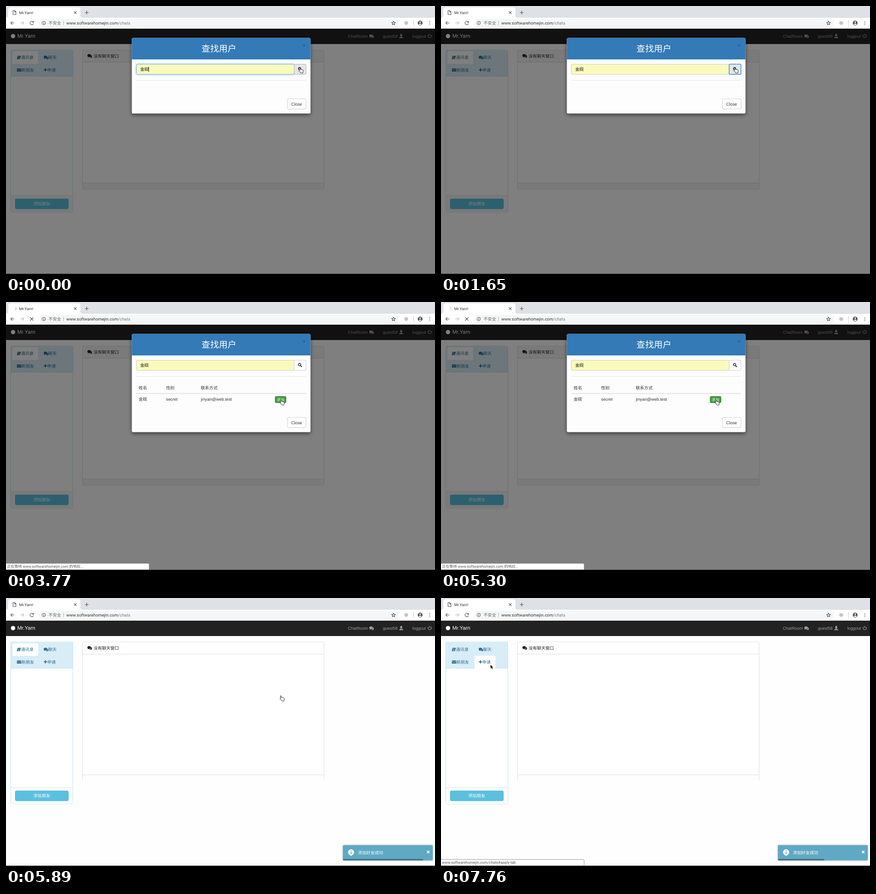
Recreate the animation shown at these times as an HTML page. Size 946 by 592 pixels, loop 8 s.

```html
<!DOCTYPE html>
<html lang="zh-CN">
<head>
<meta charset="utf-8">
<title>Mr.Yarn!</title>
<style>
  html, body { margin: 0; width: 100%; height: 100%; overflow: hidden; background: #fff; }
  svg { display: block; }
  text {
    font: 9.3px "Liberation Sans", "Noto Sans CJK SC", "Noto Sans CJK", sans-serif;
    text-rendering: geometricPrecision; white-space: pre;
  }
  .ui text { font-family: Roboto, "Noto Sans CJK SC", "Noto Sans CJK", sans-serif; fill: #333; }
  .ui .small { font-size: 8.25px; fill: #555; }
  .line { fill: none; stroke: #50545a; stroke-width: 1.2; }
  .nav { fill: #9d9d9d; }
  .nav text { font-size: 9.2px; }
  .info { fill: #31708f; }
  .mid { font-weight: 500; }
  .bold { font-weight: 700; }
</style>
</head>
<body>
<svg width="946" height="592" viewBox="0 0 946 592">
  <defs>
    <g id="chats">
      <ellipse cx="4" cy="3.3" rx="4" ry="3.1"/>
      <path d="M1.4 5 .8 7.6 4 6z"/>
      <path d="M8.6 2.2C10.7 3.4 10.8 5.9 9.3 7.2l.6 1.5-2.2-.9C6.200 8.100 5 7.700 4.300 7 7 7 8.900 5 8.600 2.200z"/>
    </g>
    <g id="glass" fill="none" stroke="#222">
      <circle cx="3.300" cy="3.300" r="2.600" stroke-width="1.400"/>
      <path d="M5.300 5.300 8.400 8.400" stroke-width="1.900"/>
    </g>
    <path id="hand" d="M.2 1.200C.2-.2 2-.2 2.200 1.200L2.700 4.200 4 4 5.500 4.300 7 4.800 8.400 5.600C9.300 7 8.700 9 8.200 10.300V12H3.500L3 10.600-.6 7.500C-1.200 6.500 0 6 .8 6.700z"
      fill="#fff" stroke="#111" stroke-width=".95" stroke-linejoin="round"/>
  </defs>

  <rect width="946" height="592" fill="#fefefe"/>

  <!-- page -->
  <g>
    <rect y="50" width="946" height="34" fill="#222"/>
    <circle cx="15.500" cy="66.500" r="4.800" fill="#fff"/>
    <text x="25" y="70.300" fill="#fff" style="font-size:11.500px">Mr.Yarn</text>
    <g class="nav">
      <text x="754" y="69.800">ChatRoom</text>
      <use href="#chats" x="801" y="62.500"/>
      <text x="831" y="69.800">guest58</text>
      <ellipse cx="871.500" cy="64.500" rx="2.300" ry="3"/>
      <path d="M867 71c0-2 2-2.600 3.300-3h2.400c1.300.4 3.300 1 3.300 3z"/>
      <text x="896" y="69.800">loggout</text>
      <path d="M932 63.400a3.700 3.700 0 1 0 4.600 0M934.300 61.800v4.400" fill="none" stroke="#9d9d9d" stroke-width="1.200"/>
    </g>

    <rect x="10.500" y="97" width="137" height="358" rx="2.500" fill="#fff" stroke="#bce8f1"/>
    <path d="M11 155V98h136v57z" fill="#d9edf7"/>
    <path d="M11 155.200h136" stroke="#bce8f1"/>
    <path id="tabA" d="M14 128v-25.500q0-2.500 2.500-2.500h52q2.500 0 2.500 2.500V128z" fill="#fff"/>
    <path id="tabB" d="M74 156v-26q0-2.500 2.500-2.500h41q2.500 0 2.500 2.500v26z"/>
    <g class="info">
      <path d="M25.800 110h7l-2 7.600h-7.200z"/>
      <path d="M26.500 112.200h4.200M26 114h4.200M24.500 116.400h6" stroke="#d9edf7" stroke-width=".6"/>
      <text x="33" y="117.300">通讯录</text>
      <use href="#chats" x="83" y="109.500"/>
      <text x="93" y="117.300">聊天</text>
      <path d="M24 138h9.600v6.800H24z"/>
      <path d="M24 139.300l4.800 3 4.800-3" fill="none" stroke="#d9edf7" stroke-width=".8"/>
      <text x="34" y="144.600">新朋友</text>
      <path d="M83.500 141h7M87 137.500v7" stroke="#31708f" stroke-width="2"/>
      <text x="91" y="144.600">申请</text>
    </g>
    <rect class="shade" x="11" y="419" width="136" height="35.500"/>
    <path d="M11 418.800h136" stroke="#ddd"/>
    <rect x="20.500" y="426" width="117" height="22" rx="2.500" fill="#5bc0de" stroke="#46b8da"/>
    <text class="mid" x="60.300" y="440.400" fill="#fff">添加朋友</text>

    <rect x="168.500" y="97" width="533" height="308" rx="2.500" fill="#fff" stroke="#ddd"/>
    <rect class="shade" x="169" y="97.500" width="532" height="26.500"/>
    <rect class="shade" x="169" y="391" width="532" height="13.500"/>
    <path d="M169 124h532M169 390.800h532" stroke="#ddd"/>
    <rect id="noEdge" x="167" y="403.500" width="536" height="3" fill="#fefefe"/>
    <use href="#chats" x="179.500" y="106" fill="#222"/>
    <text x="193" y="113.600" fill="#222">没有聊天窗口</text>
  </g>

  <!-- notification -->
  <g id="toast">
    <rect id="toastBox" x="743" y="546" width="198" height="33.500" rx="2" fill="#5fa9c4"/>
    <circle cx="761" cy="561.800" r="6.800" fill="#fff"/>
    <path d="M759 567.500l2 2.800 2-2.800z" fill="#fff"/>
    <path d="M761 560.500v5.500M761 557v2" stroke="#5fa9c4" stroke-width="1.800"/>
    <text class="mid" x="776" y="566" fill="#fff">添加好友成功</text>
    <path d="M928.300 558.300l5.400 5.400m0-5.400l-5.400 5.400" stroke="#fff" stroke-width="1.800"/>
    <rect id="progress" x="743" y="576.800" width="0" height="2.700" fill="#000" opacity=".4"/>
  </g>

  <rect id="backdrop" y="50" width="946" height="542" opacity=".5"/>

  <!-- dialog -->
  <g id="modal">
    <rect id="modalBox" x="277.500" y="70.500" width="394" height="167" rx="3" fill="#fdfdfd"
      style="filter:drop-shadow(0 3px 4px rgba(0,0,0,.55))"/>
    <path d="M277.500 118V73q0-2.500 2.500-2.500h389q2.500 0 2.500 2.500v45z" fill="#337ab7"/>
    <text class="mid" x="431" y="101.300" fill="#fff" style="font-size:19.300px">查找用户</text>
    <path d="M654.800 84.700l5 5m0-5l-5 5" stroke="#235480"/>
    <rect id="field" x="287.500" y="128.500" width="348" height="22.500" rx="2.500" fill="#f9fabc"/>
    <text x="296" y="143.200" fill="#111">金砚</text>
    <path id="caret" d="M314.800 134.500v10.500" stroke="#111"/>
    <rect id="find" x="635.500" y="128.500" width="26" height="22.500" rx="2"/>
    <use href="#glass" x="644" y="135"/>
    <path d="M287 164.500h375" stroke="#e8e8e8"/>
    <g id="results" fill="#333">
      <g class="bold">
        <text class="mid" x="292.500" y="193.200">姓名</text>
        <text class="mid" x="353" y="193.200">性别</text>
        <text class="mid" x="429.500" y="193.200">联系方式</text>
      </g>
      <path d="M287 202.300h375" stroke="#ddd" stroke-width="1.400"/>
      <text x="292.500" y="218.300">金砚</text>
      <text x="353" y="218.300">secret</text>
      <text x="429.800" y="218.300">jinyan@web.test</text>
      <rect id="add" x="593.500" y="208.500" width="24" height="14" rx="2"/>
      <text class="mid" x="597.500" y="218.600" fill="#fff" style="font-size:8px">添加</text>
    </g>
    <g id="close">
      <rect x="620.500" y="205" width="41" height="22.500" rx="2.500" fill="#fff" stroke="#ccc"/>
      <text x="629" y="219.600" fill="#333">Close</text>
    </g>
  </g>

  <!-- browser -->
  <g class="ui">
    <rect width="946" height="27" fill="#dee1e6"/>
    <path d="M0 26q5 0 5-5V8q0-5 5-5h149q5 0 5 5v13q0 5 5 5h777v24H0z" fill="#fff"/>
    <g id="sheet">
      <path class="line" d="M15.500 10.300h4l2.300 2.400v6.300h-6.300zM19.300 10.300v2.600h2.500" stroke-width="1"/>
    </g>
    <g id="busy" transform="translate(18.300 14.500)">
      <path id="arc" d="M-.7-4A4.100 4.100 0 0 1 4.100.4" fill="none" stroke="#888"/>
    </g>
    <text x="29" y="17.500" style="font-size:8.500px">Mr.Yarn!</text>
    <path class="line" d="M150 11.800l5.400 5.400m0-5.400l-5.400 5.400M174 14.500h8M178 10.500v8"/>
    <path class="line" d="M18.500 37.500h-8m3.800-3.800l-3.800 3.800 3.800 3.800"/>
    <path class="line" d="M31.500 37.500h8m-3.800-3.800l3.800 3.800-3.800 3.800" style="stroke:#bbb"/>
    <g id="reload">
      <path class="line" d="M60 34.900a4 4 0 1 0 .8 3.700"/>
      <path d="M61.500 32.800v4h-4z" fill="#50545a"/>
    </g>
    <path id="stop" class="line" d="M53.300 34l7 7m0-7l-7 7"/>
    <rect x="73" y="28.500" width="793" height="18.500" rx="9.250" fill="#f5f6f7"/>
    <circle class="line" cx="83.300" cy="37.500" r="3.900" style="stroke-width:1"/>
    <path class="line" d="M83.300 36.800v3M83.300 34.900v1"/>
    <text x="93.700" y="41" style="fill:#666">不安全</text>
    <path d="M126.800 33v9.500" stroke="#aaa"/>
    <text x="133" y="41" style="font-size:9.400px">www.softwarehomejin.com<tspan fill="#777">/chats</tspan></text>
    <path class="line" d="M854.500 33.300l1.200 2.900 3.100.2-2.400 2 .8 3-2.700-1.700-2.700 1.700.8-3-2.400-2 3.100-.2z" stroke-linejoin="round"/>
    <circle cx="882.500" cy="37.500" r="4.300" fill="#c4c6c8"/>
    <path d="M898.500 32v11" stroke="#ccc"/>
    <circle cx="913.300" cy="37.500" r="5.300" fill="#50545a"/>
    <circle cx="913.300" cy="35.700" r="1.700" fill="#fff"/>
    <path d="M909.800 40.300q3.500-3 7 0-3.500 3-7 0z" fill="#fff"/>
    <path d="M934.500 33.200v1.600m0 2v1.600m0 2v1.600" stroke="#50545a" stroke-width="1.600"/>
    <g id="status">
      <path d="M-1 577.500h314q2.500 0 2.500 2.500v11.500H-1z" fill="#fff" stroke="#999"/>
      <text class="small" id="linkA" x="2" y="587.300">www.softwarehomejin.com/friendships?friend_id=107</text>
      <text class="small" id="waiting" x="2" y="587.300">正在等待 www.softwarehomejin.com 的响应...</text>
      <text class="small" id="linkB" x="2" y="587.300">www.softwarehomejin.com/chats#apply-tab</text>
    </g>
    <path d="M0 591.500h946" stroke="#444"/>
  </g>

  <g id="pointer"><use href="#hand"/></g>
  <g id="arrow">
    <path d="M0 0v9.200l2.100-1.900 1.500 3.300 1.600-.7-1.500-3.200h2.900z" fill="#000" stroke="#fff" stroke-width=".6"/>
  </g>
</svg>
<script>
const LOOP = 8000;

// Holds each value from its time until the next one.
function track(target, prop, steps) {
  const frames = steps.map(([time, value]) => ({ offset: time / LOOP, [prop]: value, easing: 'steps(1, end)' }));
  frames.push({ offset: 1, [prop]: steps[steps.length - 1][1] });
  for (const el of document.querySelectorAll(target)) {
    el.animate(frames, { duration: LOOP, iterations: Infinity });
  }
}

function show(target, ...spans) {
  const steps = spans[0][0] > 0 ? [[0, 'hidden']] : [];
  for (const [from, to] of spans) {
    steps.push([from, 'visible']);
    if (to < LOOP) steps.push([to, 'hidden']);
  }
  track(target, 'visibility', steps);
}

const at = (x, y) => `translate(${x}px, ${y}px)`;
const run = (start, gap, count) => Array.from({ length: count }, (_, i) => start + gap * i);

const FOUND = 1880, HOVER = 2190, CLICK = 2760, LOADED = 5450, SETTLED = 5890, TAB = 7760;

// search dialog
show('#backdrop, #modal', [0, LOADED]);
show('#caret', [0, 150]);
show('#results', [FOUND, LOADED]);
track('#modalBox', 'height', [[0, '167px'], [FOUND, '217px']]);
track('#close', 'transform', [[0, at(0, 0)], [FOUND, at(0, 50)]]);
track('#field', 'stroke', [[0, '#66afe9'], [150, '#ccc']]);
track('#field', 'filter', [[0, 'drop-shadow(0 0 2px rgba(102,175,233,.7))'], [150, 'none']]);
track('#find', 'fill', [[0, '#e6e6e6'], [CLICK, '#fff']]);
track('#find', 'stroke', [[0, '#adadad'], [150, '#639fe6'], [CLICK, '#ccc']]);
track('#find', 'strokeWidth', [[0, '1px'], [150, '2px'], [CLICK, '1px']]);
track('#add', 'fill', [[0, '#5cb85c'], [HOVER, '#449d44']]);
track('#add', 'stroke', [[0, '#4cae4c'], [HOVER, '#398439']]);

// page load
show('#sheet, #reload', [0, CLICK], [LOADED, LOOP]);
show('#busy, #stop', [CLICK, LOADED]);
const spins = [0, ...run(CLICK, 168, 7), 3980, ...run(4270, 172, 7)];
track('#arc', 'transform', spins.map(t => [t, `rotate(${(5300 - t) * 0.27}deg)`]));

// status bubble
show('#status', [2470, SETTLED], [TAB, LOOP]);
show('#linkA', [2470, CLICK]);
show('#waiting', [CLICK, SETTLED]);
show('#linkB', [TAB, LOOP]);

// notification
track('#toast', 'opacity', [[0, 0], [LOADED, 0.2], [5630, 0.8], [SETTLED, 1]]);
track('#toastBox', 'filter', [[0, 'none'], [5630, 'drop-shadow(0 0 2px #aaa)']]);
const ticks = [5630, SETTLED, 6300, 6600, 6860, 7160, 7460, TAB];
track('#progress', 'width', [[0, '0px'], ...ticks.map(t => [t, `${198 * (1 - (t - 5360) / 4950)}px`])]);

// panels
track('.shade', 'fill', [[0, '#f4f4f4'], [SETTLED, '#fefefe']]);
show('#noEdge', [SETTLED, LOOP]);
show('#tabA', [0, TAB]);
track('#tabB', 'fill', [[0, 'transparent'], [7460, '#eee'], [TAB, '#fff']]);

// mouse
show('#pointer', [0, 6600], [7460, TAB]);
track('#pointer', 'transform', [[0, at(646.5, 136)], [HOVER, at(604.8, 215.5)], [7460, at(106, 146)]]);
show('#arrow', [6600, 7460], [TAB, LOOP]);
track('#arrow', 'transform', [[0, at(574, 219)], [6860, at(520, 215.5)], [7160, at(392, 207)], [TAB, at(109, 147)]]);
</script>
</body>
</html>
```
